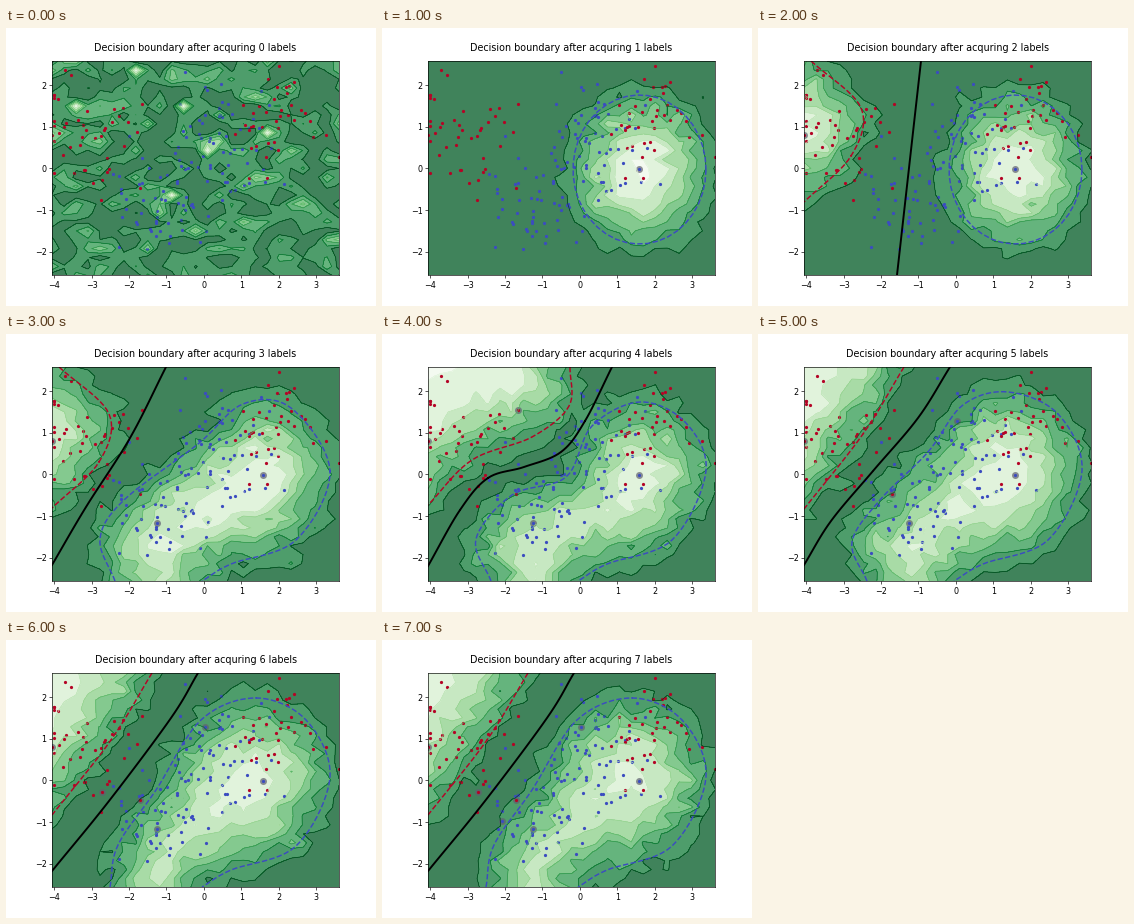
A matplotlib script that plays this animation: 370x278 px, repeating every 8000 ms.

```python
import numpy as np
import matplotlib.pyplot as plt
from matplotlib.animation import FuncAnimation
from matplotlib.path import Path

W, H, DPI = 370, 278, 58
BLUE, RED = "#3b4cc0", "#b40426"
GRID = 25
LEVELS = np.linspace(0, 1, 9)


def to_data(points):
    """Stage pixels (y down) to plot units."""
    p = np.asarray(points, float)
    return np.column_stack([(p[:, 0] - 197.8) / 37.43, (140.5 - p[:, 1]) / 41.5])


def curve(*keys):
    """Smooth line through a few key points (Catmull-Rom)."""
    p = to_data(keys)
    p = np.vstack([2 * p[0] - p[1], p, 2 * p[-1] - p[-2]])
    t = np.linspace(0, 1, 12)[:, None]
    parts = []
    for a, b, c, d in zip(p, p[1:], p[2:], p[3:]):
        parts.append(b + t / 2 * (c - a + t * (2 * a - 5 * b + 4 * c - d
                                               + t * (3 * (b - c) + d - a))))
    return np.vstack(parts)


(x0, y0), (x1, y1) = to_data([(46.25, 247.4), (333, 33.4)])
X, Y = np.meshgrid(np.linspace(x0, x1, GRID), np.linspace(y0, y1, GRID))
nodes = np.column_stack([X.ravel(), Y.ravel()])

# Labelled points, in stage pixels
right, low, top, edge = (257, 141), (151, 189), (199, 87), (120, 181)
left, near, upper, mid = (46, 107), (96, 152), (136, 76), (134, 160)


def cluster(rng, n, center, spread):
    p = rng.normal(center, spread, (n, 2))
    return np.clip(p, (48, 36), (331, 244))


rng = np.random.default_rng(8)
reds = to_data(np.vstack([
    [left, near, upper, mid, (333, 129)],
    cluster(rng, 40, (80, 103), (24, 27)),
    cluster(rng, 38, (267, 95), (22, 27))]))
blues = to_data(np.vstack([
    [right, low, top, edge],
    cluster(rng, 55, (208, 112), (27, 28)),
    cluster(rng, 52, (168, 177), (34, 24))]))

# Margins of both classes and the boundary between them
turn = np.linspace(0, 2 * np.pi, 40)
ring = to_data(np.column_stack([257.5 + 66.5 * np.cos(turn),
                                141.5 + 74.5 * np.sin(turn)]))
tail = [(324, 137), (290, 206), (225, 230), (196, 247)]
arch = [(250, 58), (300, 80)] + tail

blue_3 = curve((109, 247), (94, 205), (118, 166), (192, 110), (237, 70),
               (285, 74), *tail)
blue_4 = curve((109, 247), (94, 205), (130, 161), (184, 143), (210, 92),
               (258, 68), (303, 88), *tail)
blue_5 = curve((109, 247), (94, 208), (122, 166), (170, 118), (205, 71), *arch)
blue_7 = curve((104, 247), (112, 205), (150, 150), (195, 80), *arch)

red_3 = curve((53, 33), (103, 80), (93, 128), (46, 174))
red_4 = curve((188, 33), (187, 72), (150, 103), (90, 126), (46, 171))
red_5 = curve((146, 33), (105, 100), (46, 175))

split_2 = curve((163, 33), (139, 247))
split_3 = curve((160, 33), (124, 104), (80, 173), (46, 231))
split_4 = curve((230, 33), (203, 87), (179, 118), (142, 133), (106, 144),
                (78, 176), (46, 232))
split_5 = curve((192, 33), (160, 84), (115, 137), (73, 187), (46, 231))
split_7 = curve((192, 33), (165, 78), (103, 161), (46, 231))

# Per step: labelled points, blue margin, red margin, boundary
base = [right, left, low]
steps = [
    ([], None, None, None),
    ([right], ring, None, None),
    ([right, left], ring, red_3, split_2),
    (base, blue_3, red_3, split_3),
    (base + [upper], blue_4, red_4, split_4),
    (base + [top, mid], blue_5, red_5, split_5),
    (base + [top, mid, near], blue_7, red_5, split_7),
    (base + [top, mid, near, edge], blue_7, red_5, split_7),
]


def depth(line, apex):
    """Distance inside a margin that closes at an apex off the stage."""
    gap = np.linalg.norm(nodes[:, None] - line, axis=2).min(axis=1)
    inside = Path(np.vstack([line, to_data([apex])])).contains_points(nodes)
    return np.where(inside, gap, -gap).reshape(X.shape)


def unlabelled():
    n = np.random.default_rng(4).normal(size=X.shape)
    n = (n + .4 * np.roll(n, 1, 1)) / 1.08
    z = np.minimum(.2 * np.abs(n), .6)
    spots = [(177, 78), (70, 78), (200, 123), (168, 170), (256, 103), (124, 42)]
    for x, y in to_data(spots):
        z.flat[np.argmin(np.hypot(X - x, Y - y))] = .9
    return z


def confidence(i):
    _, blue_line, red_line, _ = steps[i]
    if blue_line is None:
        return unlabelled()
    d = depth(blue_line, (200, 600))
    if red_line is not None:
        d = np.maximum(d, depth(red_line, (-200, -200)))
    noise = np.random.default_rng(20 + i).normal(0, .33, X.shape)
    return (1 - .025 * i) / (1 + np.exp((.55 - d) / .45 + noise))


fig = plt.figure(figsize=(W / DPI, H / DPI), dpi=DPI)
ax = fig.add_axes([.125, .11, .775, .77])


def draw(i):
    ax.clear()
    labelled, blue_line, red_line, split = steps[i]
    z = confidence(i)
    ax.contourf(X, Y, z, LEVELS, cmap="Greens_r", alpha=.75, vmin=0, vmax=1)
    ax.contour(X, Y, z, LEVELS[1:-1], cmap="Greens_r", linewidths=.8,
               vmin=.125, vmax=1)
    if labelled:
        ax.scatter(*to_data(labelled).T, s=75, color="#606070", alpha=.7, lw=0)
    ax.scatter(*blues.T, s=16, color=BLUE, lw=0)
    ax.scatter(*reds.T, s=16, color=RED, lw=0)
    for line, color, style, width in ((blue_line, BLUE, "--", 1.8),
                                      (red_line, RED, "--", 1.8),
                                      (split, "black", "-", 2.4)):
        if line is not None:
            ax.plot(*line.T, style, color=color, lw=width)
    ax.set_xlim(x0, x1)
    ax.set_ylim(y0, y1)
    ax.set_xticks(range(-4, 4))
    ax.set_yticks(range(-2, 3))
    ax.text(.5, 1.05, f"Decision boundary after acquring {i} labels",
            transform=ax.transAxes, ha="center", fontsize=12)
    return []


anim = FuncAnimation(fig, draw, frames=len(steps), interval=1000,
                     init_func=lambda: [], repeat=True, repeat_delay=0)
plt.show()
```
